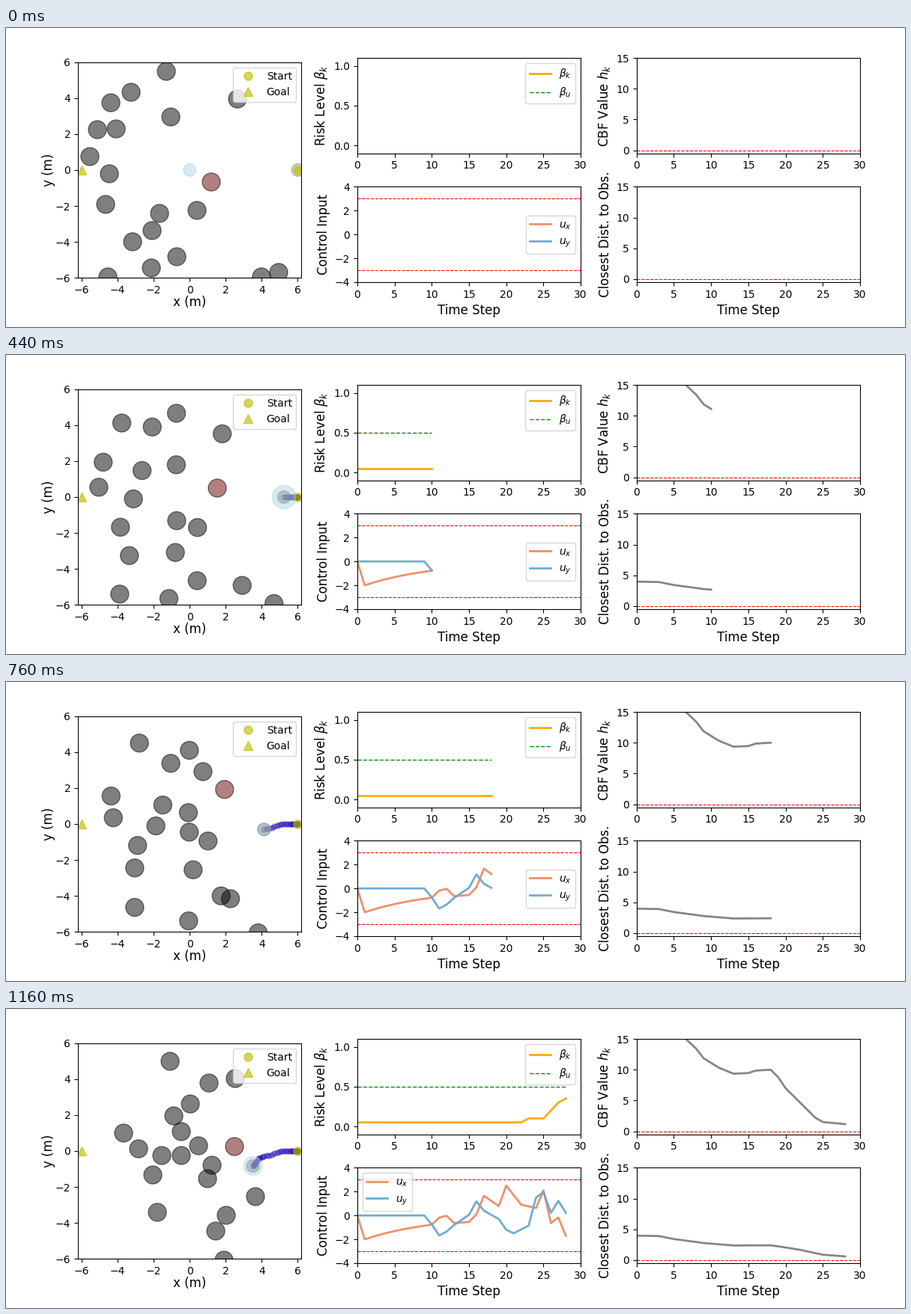
Animation, 1200 px wide and 400 px high, one loop 1200 ms. Source, as a matplotlib script:

```python
import numpy as np
import matplotlib.pyplot as plt
from matplotlib.animation import FuncAnimation
from matplotlib.patches import Circle

STEPS = 30
DT = 0.1
UNIT = 24.056  # pixels per metre in the map

# Each obstacle: start, middle and end point on the stage
MID, END = 16, STEPS - 1
ROUTES = [
    [(214, 58), (238, 88), (271, 99)], [(167, 86), (212, 104), (246, 127)],
    [(140, 100), (168, 85), (219, 70)], [(122, 136), (136, 149), (157, 166)],
    [(147, 135), (201, 163), (234, 164)], [(112, 172), (135, 180), (177, 187)],
    [(138, 195), (190, 192), (234, 196)], [(133, 236), (167, 224), (208, 196)],
    [(220, 119), (236, 165), (275, 209)], [(309, 95), (273, 114), (224, 143)],
    [(274, 206), (288, 157), (306, 93)], [(205, 248), (240, 207), (257, 183)],
    [(255, 244), (262, 220), (305, 184)], [(195, 271), (243, 257), (269, 227)],
    [(169, 286), (167, 256), (196, 222)], [(194, 321), (234, 324), (280, 297)],
    [(228, 306), (275, 294), (333, 251)], [(136, 333), (164, 309), (202, 272)],
    [(341, 333), (303, 295), (294, 276)], [(364, 327), (347, 335), (291, 336)],
]


def blend(s, span, a, b, slope_a, slope_b):
    """Cubic Hermite curve from a to b for s in 0..1."""
    return (a + (b - a) * s * s * (3 - 2 * s)
            + span * s * (1 - s) * (slope_a * (1 - s) - slope_b * s))


def obstacle_at(t):
    """All obstacle centres at step t: they start at rest and speed up."""
    start, mid, end = np.moveaxis(np.array(ROUTES, float), 1, 0)
    v1, v2 = (mid - start) / MID, (end - mid) / (END - MID)
    v_mid = (v1 * (END - MID) + v2 * MID) / END
    if t < MID:
        p = blend(t / MID, MID, start, mid, 0, v_mid)
    else:
        p = blend((t - MID) / (END - MID), END - MID, mid, end, v_mid, v2)
    return (p - (245.14, 190)) / (UNIT, -UNIT)


def integrate(u, pos):
    """Positions of a double integrator driven by u."""
    vel, path = 0.0, [pos]
    for a in u:
        pos += vel * DT + a * DT**2 / 2
        vel += a * DT
        path.append(pos)
    return np.array(path)


time = np.arange(STEPS - 1)


def curve(*knots):
    """Straight pieces through (step, value) knots."""
    return np.interp(time, *zip(*knots))


ux = curve((10, -0.77), (11, -0.18), (12, -0.03), (13, -0.65), (15, -0.55),
           (16, 0.1), (17, 1.65), (19, 0.78), (20, 2.5), (22, 0.9), (24, 0.62),
           (25, 2.1), (26, -0.65), (27, -0.17), (28, -1.7))
ux[:11] = -2 * np.exp(-0.105 * (time[:11] - 1))
ux[0] = 0
uy = curve((9, 0), (10, -0.75), (11, -1.68), (12, -1.35), (13, -0.8), (15, 0.05),
           (16, 1.18), (17, 0.4), (19, -0.3), (20, -1.2), (21, -1.5), (23, -0.85),
           (24, 1.5), (25, 1.95), (26, 0.22), (27, 1.22), (28, 0.22))
beta = curve((22, 0.05), (23, 0.1), (25, 0.1), (27, 0.3), (28, 0.35))
cbf = curve((0, 25), (6, 15.7), (8, 13.4), (9, 11.85), (11, 10.35), (13, 9.35),
            (15, 9.45), (16, 9.85), (18, 10), (19, 8.8), (20, 7), (24, 2.2),
            (25, 1.5), (28, 1.15))
dist = curve((0, 3.97), (3, 3.9), (5, 3.42), (9, 2.77), (13, 2.37), (18, 2.4),
             (20, 2.05), (22, 1.65), (25, 0.87), (28, 0.6))

robot_path = np.column_stack([integrate(ux, 6.0), integrate(uy, 0.0)])
halo_r = np.interp(np.arange(STEPS), [0, 4, 8, 13, 19, 23, 29],
                   [0.35, 0.56, 0.7, 0.62, 0.37, 0.8, 0.51])

fig = plt.figure(figsize=(12, 4), dpi=100)
grid = fig.add_gridspec(2, 3, left=0.08, right=0.95, bottom=0.15, top=0.9,
                        wspace=0.25, hspace=0.35)

# Map
world = fig.add_subplot(grid[:, 0])
world.set(xlim=(-6.2, 6.2), ylim=(-6, 6), aspect="equal",
          xticks=range(-6, 7, 2), yticks=range(-6, 7, 2))
world.set_xlabel("x (m)", fontsize=12, labelpad=0)
world.set_ylabel("y (m)", fontsize=12, labelpad=0)

obstacles = [world.add_patch(Circle(p, 0.5, color="k", alpha=0.5))
             for p in obstacle_at(0)]
trail = world.scatter([], [], s=25, color=(0.1, 0, 0.68), alpha=0.4, zorder=1.2)
halo = world.add_patch(Circle((0, 0), 0.35, color="lightblue", alpha=0.5, zorder=1.3))
robot = world.add_patch(Circle((6, 0), 0.35, color="gray", alpha=0.4, zorder=1.4))
world.plot(6, 0, "yo", ms=8, alpha=0.65, ls="none", label="Start")
world.plot(-6, 0, "y^", ms=8, alpha=0.65, ls="none", label="Goal")
world.legend(loc="upper right")


def chart(row, col, ylabel, ylim, yticks, limits=()):
    ax = fig.add_subplot(grid[row, col])
    ax.set(xlim=(0, 30), ylim=ylim, xticks=range(0, 31, 5), yticks=yticks)
    ax.set_ylabel(ylabel, fontsize=12)
    if row == 1:
        ax.set_xlabel("Time Step", fontsize=12)
    for y in limits:
        ax.axhline(y, color="r", ls="--", lw=0.8)
    return ax


risk = chart(0, 1, r"Risk Level $\beta_k$", (-0.1, 1.1), [0, 0.5, 1])
ctrl = chart(1, 1, "Control Input", (-4, 4), range(-4, 5, 2), (3, -3))
safe = chart(0, 2, "CBF Value $h_k$", (-0.5, 15), range(0, 16, 5), (0,))
near = chart(1, 2, "Closest Dist. to Obs.", (-0.5, 15), range(0, 16, 5), (0,))

series = []


def add_line(ax, data, color, label=None, ls="-", lw=2):
    line, = ax.plot([], [], color=color, ls=ls, lw=lw, alpha=0.95, label=label)
    series.append((line, data))


add_line(risk, beta, "orange", r"$\beta_k$")
add_line(risk, np.full(len(time), 0.5), "g", r"$\beta_u$", "--", 1)
add_line(ctrl, ux, "#ef8a62", "$u_x$")
add_line(ctrl, uy, "#67a9cf", "$u_y$")
add_line(safe, cbf, "gray")
add_line(near, dist, "gray")
risk.legend(loc="upper right")
ctrl.legend(loc="best")


def draw(i):
    pos, centres = robot_path[i], obstacle_at(i)
    closest = np.argmin(np.hypot(*(centres - pos).T))
    for n, (disc, p) in enumerate(zip(obstacles, centres)):
        disc.center = p
        disc.set_facecolor((0.4, 0, 0) if n == closest else "k")
    robot.center = pos
    halo.center = pos if i else (0, 0)
    halo.set_radius(halo_r[i])
    trail.set_offsets(robot_path[1:i + 1])
    for line, data in series:
        line.set_data(time[:i], data[:i])
    return []


anim = FuncAnimation(fig, draw, frames=STEPS, init_func=lambda: draw(0),
                     interval=1200 / STEPS, repeat=True, repeat_delay=0, blit=False)
plt.show()
```
